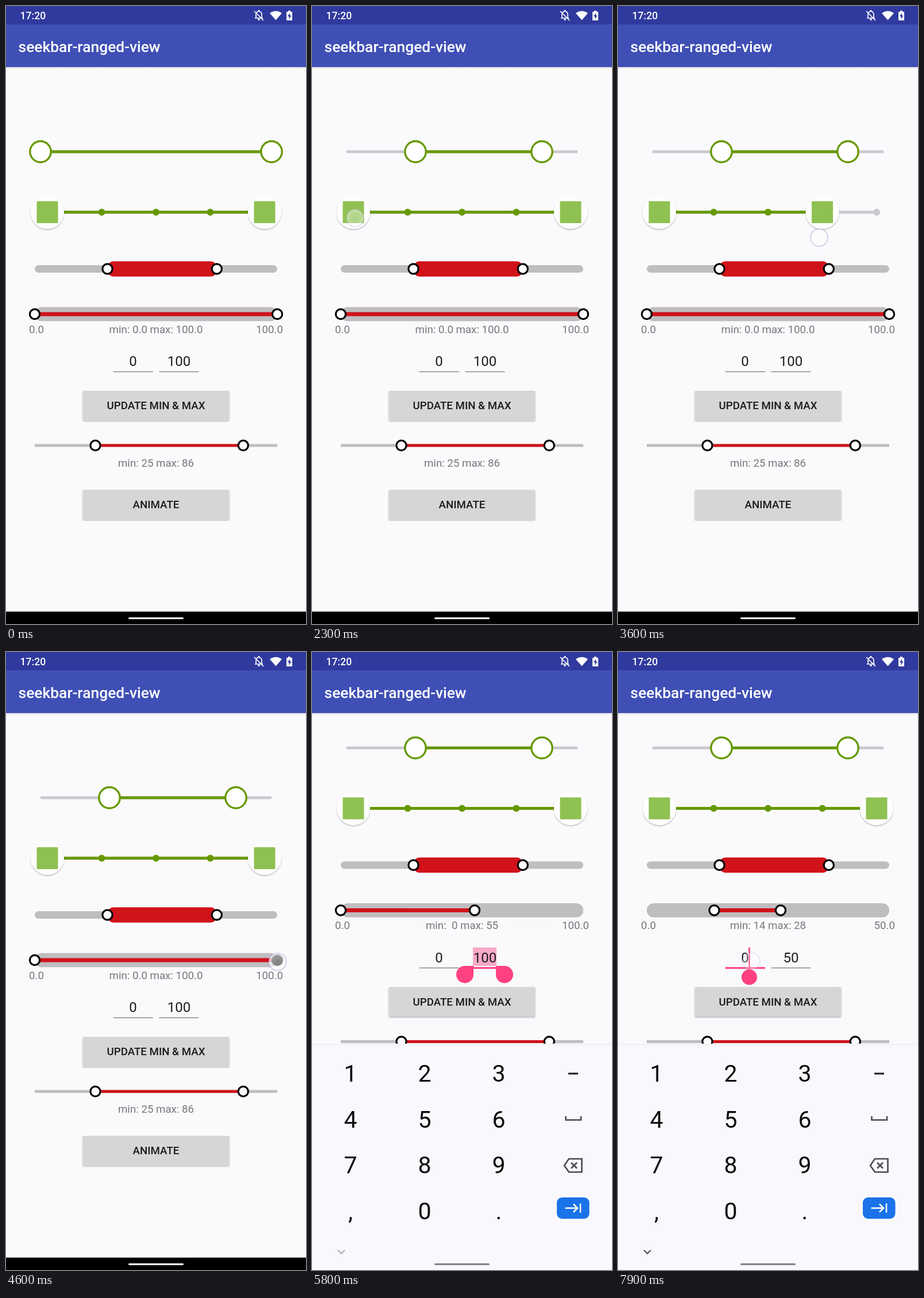
Animation of 522 by 1073 pixels, one loop 8 s. Source, as an HTML page:

```html
<!DOCTYPE html>
<html lang="en">
<head>
<meta charset="utf-8">
<title>seekbar-ranged-view</title>
<style>
  html, body { margin: 0; width: 100%; height: 100%; overflow: hidden; background: #faf9fc; }
  svg { display: block; width: 522px; height: 1073px; font-family: Roboto, Arial, sans-serif; }
  .label { font-size: 18.7px; fill: #78767a; }
  .field { font-size: 24px; fill: #1d1c1e; text-anchor: middle; }
  .button { font-size: 18.7px; font-weight: 500; fill: #1b1a1c; text-anchor: middle; }
  .key { font-size: 41px; fill: #0b0b0c; text-anchor: middle; }
  .mid { text-anchor: middle; }
  .end { text-anchor: end; }
  .pink { fill: #ff4081; }
  .icon { fill: none; stroke: #4a494d; stroke-width: 2.6; }
  .ring { fill: #fff; stroke: #000; stroke-width: 3.2; }
  .big { fill: #fff; stroke: #669900; stroke-width: 3.4; }
  .hot { fill: #ff4081; stroke: #ff4081; }
  .dark { fill: #111; }
</style>
</head>
<body>
<svg id="stage" viewBox="0 0 522 1073"></svg>
<script>
const LOOP = 8000, SHIFT = -86.5;
const STOPS = [72, 166.5, 261, 355.5, 450];
const GREEN = '#669900', RED = '#d0121a', GREY = '#bfbdc0', PALE = '#cbc9cd';

// Tables of [time, value...]
const track = {
  greenMin: [[300, 60], [1100, 180]],
  greenMax: [[1580, 462], [1950, 400]],
  rangeMin: [[7250, 50], [7600, 167.5]],
  rangeMax: [[4640, 472], [4860, 310], [5100, 283]],
  keyboard: [[5480, 0], [5740, 1]],
  popup: [[5780, 0], [5960, 1], [6120, 1], [6190, 0]],
  ripple: [[6680, 0], [6780, 1], [6860, 1], [7000, 0]]
};
const snap = {
  stepMin: [[0, 0], [2500, 1], [2650, 2], [2800, 1], [2900, 0]],
  stepMax: [[0, 4], [3400, 3], [3690, 4]],
  right: [[0, '100'], [6150, '5'], [6400, '50']]
};
// Each gesture: [time, x, y] points; fades in before the first and out after the last
const gestures = [
  [[220, 62, 256], [300, 62, 256], [1100, 182, 258]],
  [[1450, 463, 256], [1580, 463, 256], [1950, 401, 258]],
  [[2340, 75, 368], [2420, 76, 369], [2680, 262, 376], [2920, 74, 374]],
  [[3200, 452, 366], [3280, 452, 368], [3500, 350, 402], [3610, 350, 402], [3800, 474, 442], [3980, 474, 442]],
  [[4500, 472.5, 538], [4640, 472.5, 538], [4860, 311, 562], [5100, 284, 580]],
  [[5440, 301, 617], [5480, 301, 617]],
  [[6120, 196, 812], [6150, 196, 812]],
  [[6380, 196, 972], [6420, 196, 972]],
  [[6750, 262, 610], [6850, 262, 610]],
  [[7200, 51, 452], [7250, 51, 452], [7600, 168, 455]],
  [[7790, 232, 537], [7830, 232, 537]]
];

function lerpAt(rows, t, col = 1) {
  if (t <= rows[0][0]) return rows[0][col];
  for (let i = 1; i < rows.length; i++) {
    const a = rows[i - 1], b = rows[i];
    if (t < b[0]) return a[col] + (b[col] - a[col]) * (t - a[0]) / (b[0] - a[0]);
  }
  return rows[rows.length - 1][col];
}
const stepAt = (rows, t) => rows.filter(r => r[0] <= t).pop()[1];
const between = (t, a, b) => t >= a && t < b;

const rect = (x, y, w, h, fill, r = 0, id = '') =>
  `<rect ${id && `id="${id}"`} x="${x}" y="${y}" width="${w}" height="${h}" rx="${r}" fill="${fill}"/>`;
const bar = (x1, x2, y, h, fill, r = 0, id = '') => rect(x1, y - h / 2, x2 - x1, h, fill, r, id);
const disc = (x, y, r, cls, id = '') => `<circle ${id && `id="${id}"`} class="${cls}" cx="${x}" cy="${y}" r="${r}"/>`;
const text = (x, y, cls, s, id = '') => `<text ${id && `id="${id}"`} x="${x}" y="${y}" class="${cls}">${s}</text>`;
const button = (y, s, id) =>
  `<g filter="url(#lift)">${rect(133.5, y, 255, 51.5, '#d7d5d8', 2, id)}</g>` + text(261, y + 32.3, 'button', s);
const knob = id => `<g id="${id}"><circle cy="358" r="29" fill="#fefefe" filter="url(#lift)"/>
  ${rect(-18.5, 339, 37, 38, '#8fc152')}</g>`;

const statusBar = `
  ${rect(0, 0, 522, 106, '#3f4fb5')}${rect(0, 0, 522, 32, '#303a9e')}
  <text x="24.5" y="23" font-size="17.6" font-weight="500" fill="#fff">17:20</text>
  <text x="21.5" y="79.5" font-size="26.4" font-weight="500" fill="#fff">seekbar-ranged-view</text>
  <g fill="none" stroke="#fff" stroke-width="1.7">
    <path d="M433 21h14M435 21v-6q0-5 5-6 5 1 5 6v6M432 9l16 16"/>
    <path d="M438.3 23.5h3.4M440 7v2" stroke-width="2.4"/>
  </g>
  <path d="M459 12.5q10.500-7.500 21 0L469.500 24.500z" fill="#fff"/>
  <path d="M491 8h4v2h3v15h-10V10h3z" fill="#fff"/>
  <path d="M494 12l-4 6h2.500v5l4-6.500H494z" fill="#303a9e"/>`;

const content = `
  ${bar(60, 462, 253, 5, PALE)}${bar(60, 462, 253, 5, GREEN, 0, 'greenBar')}
  ${disc(60, 253, 18.2, 'big', 'greenMin')}${disc(462, 253, 18.2, 'big', 'greenMax')}
  ${bar(72, 450, 358, 5, PALE)}${bar(72, 450, 358, 5, GREEN, 0, 'stepBar')}
  ${STOPS.map((x, i) => disc(x, 358, 6, '', 'stop' + i)).join('')}
  ${knob('stepMin')}${knob('stepMax')}
  ${bar(50, 472, 456.5, 13, GREY, 6.5)}${bar(176.5, 366.8, 456.5, 26.5, RED, 11)}
  ${disc(176.5, 456.5, 8.6, 'ring')}${disc(366.8, 456.5, 8.6, 'ring')}
  ${bar(50, 472, 535, 24.5, GREY, 12)}${bar(50, 472, 535, 7, RED, 0, 'rangeBar')}
  ${disc(50, 535, 8.6, 'ring', 'rangeMin')}${disc(472, 535, 8.6, 'ring', 'rangeMax')}
  ${text(40, 567.7, 'label', '0.0')}${text(261, 567.7, 'label mid', '', 'rangeText')}
  ${text(482, 567.7, 'label end', '', 'limit')}
  ${rect(280, 599.5, 41, 32, '#f9a9c6', 0, 'selection')}
  ${text(221, 625, 'field', '0')}${text(301, 625, 'field', '', 'rightField')}
  ${bar(186.5, 256, 635, 1.4, '#858387', 0, 'lineLeft')}${bar(266.5, 335.5, 635, 1.4, '#858387', 0, 'lineRight')}
  ${rect(0, 599.5, 2.6, 35, '#ff4081', 0, 'cursor')}
  ${button(668, 'UPDATE MIN &amp; MAX', 'update')}
  ${bar(50, 472, 763, 5, GREY)}${bar(155.5, 412.8, 763, 5, RED)}
  ${disc(155.5, 763, 8.6, 'ring')}${disc(412.8, 763, 8.6, 'ring')}
  ${text(261, 800, 'label mid', 'min: 25 max: 86')}
  ${button(840, 'ANIMATE', 'animate')}
  <g id="handles" class="pink">
    <path d="M281 631.500v15a15 15 0 1 1-15-15z"/><path d="M320 631.500v15a15 15 0 1 0 15-15z"/>
  </g>
  <path id="handle" class="pink" d="M228.500 635l9.500 6.500a13.500 13.500 0 1 1-19 0z"/>
  <g id="popup"><g filter="url(#lift)">${rect(163, 527, 270, 64, '#fff', 4)}</g>
    ${text(208, 563.5, 'button', 'Cortar')}${text(294, 563.5, 'button', 'Copiar')}${text(384, 563.5, 'button', 'Partilhar')}
  </g>`;

const rows = ['123', '456', '789', ',0.'];
const keyboard = `
  ${rect(0, 680, 522, 3, '#f2f1f5')}${rect(0, 683, 522, 390, '#f9f8fc')}
  ${rows.map((row, j) => [...row].map((c, i) => text(67 + 129 * i, 746 + 79.7 * j, 'key', c)).join('')).join('')}
  ${rect(446, 730.5, 17, 3, '#1b1a1c')}
  <path class="icon" d="M441.500 806v6.500h26.500v-6.500"/>
  <path class="icon" d="M447 880h22.500v23H447l-8-11.500zM451 886.500l10 10M461 886.500l-10 10"/>
  ${rect(426, 947, 56.5, 37, '#1a73e8', 9)}
  <path d="M440.500 965.500h21M455 958.500l7 7-7 7M467 957.500v16" fill="none" stroke="#fff" stroke-width="2.6"/>
  <path id="chevron" class="icon" d="M45 1038.500l6 6 6-6" style="stroke-width:2"/>`;

document.getElementById('stage').innerHTML = `
  <defs>
    <filter id="lift" x="-20%" y="-20%" width="140%" height="150%">
      <feDropShadow dx="0" dy="1.6" stdDeviation="1.3" flood-color="#000" flood-opacity=".28"/>
    </filter>
    <radialGradient id="glow">
      <stop offset="0" stop-color="#fff" stop-opacity=".46"/>
      <stop offset=".6" stop-color="#fff" stop-opacity=".56"/>
      <stop offset="1" stop-color="#fff" stop-opacity=".82"/>
    </radialGradient>
    <linearGradient id="edge" x2="0" y2="1"><stop stop-color="#dddce2"/><stop offset="1" stop-color="#faf9fc"/></linearGradient>
  </defs>
  ${rect(0, 0, 522, 1073, '#faf9fc')}${rect(0, 106, 522, 4, 'url(#edge)')}
  <g id="content">${content}</g>
  ${statusBar}
  ${rect(0, 1051.5, 522, 21.5, '#000')}
  <g id="keyboard">${keyboard}</g>
  ${rect(213, 1061.5, 96, 3, '#fff', 1.5, 'pill')}
  <circle id="touch" r="15" fill="url(#glow)" stroke="#a9abd8" stroke-opacity=".65" stroke-width="1.5"/>`;

const el = {};
document.querySelectorAll('[id]').forEach(n => el[n.id] = n);
const set = (id, attrs) => { for (const k in attrs) el[id].setAttribute(k, attrs[k]); };
const show = (id, on) => set(id, { opacity: +on });
const span = (id, a, b) => set(id, { x: a, width: Math.max(0, b - a) });
const thumb = (id, x, cls) => set(id, { cx: x, class: cls });
const write = (id, s) => { if (el[id].textContent !== s) el[id].textContent = s; };

function drawTouch(t) {
  let alpha = 0;
  for (const g of gestures) {
    const first = g[0][0], last = g[g.length - 1][0];
    if (!between(t, first - 100, last + 130)) continue;
    const a = t < first ? (t - first + 100) / 100 : t > last ? 1 - (t - last) / 130 : 1;
    if (a < alpha) continue;
    alpha = a;
    set('touch', { cx: lerpAt(g, t, 1), cy: lerpAt(g, t, 2) });
  }
  show('touch', alpha);
}

function underline(id, on) {
  set(id, on ? { y: 633.6, height: 3, fill: '#ff4081' } : { y: 634.3, height: 1.4, fill: '#858387' });
}

function draw(t) {
  const v = {};
  for (const k in track) v[k] = lerpAt(track[k], t);

  thumb('greenMin', v.greenMin, between(t, 220, 1130) ? 'big hot' : 'big');
  thumb('greenMax', v.greenMax, between(t, 1450, 1980) ? 'big hot' : 'big');
  span('greenBar', v.greenMin, v.greenMax);

  const lo = STOPS[stepAt(snap.stepMin, t)], hi = STOPS[stepAt(snap.stepMax, t)];
  set('stepMin', { transform: `translate(${lo} 0)` });
  set('stepMax', { transform: `translate(${hi} 0)` });
  span('stepBar', lo, hi);
  STOPS.forEach((x, i) => set('stop' + i, { fill: x >= lo && x <= hi ? GREEN : PALE }));

  thumb('rangeMin', v.rangeMin, between(t, 7200, 7630) ? 'ring dark' : 'ring');
  thumb('rangeMax', v.rangeMax, between(t, 4500, 5130) ? 'ring dark' : 'ring');
  span('rangeBar', v.rangeMin, v.rangeMax);
  const max = t < 6800 ? 100 : 50;
  const value = x => String(Math.round((x - 50) / 422 * max)).padStart(2, '\u00a0');
  write('rangeText', t < 4640 ? 'min: 0.0 max: 100.0' : `min: ${value(v.rangeMin)} max: ${value(v.rangeMax)}`);
  write('limit', max + '.0');

  const editing = between(t, 5480, 7800), selected = between(t, 5480, 6150), leftFocus = t >= 7800;
  write('rightField', stepAt(snap.right, t));
  underline('lineLeft', leftFocus);
  underline('lineRight', editing);
  show('selection', selected);
  show('handles', between(t, 5640, 6150));
  show('handle', leftFocus);
  show('cursor', leftFocus || between(t, 6150, 6900) || between(t, 7400, 7800));
  set('cursor', { x: leftFocus ? 227.2 : t < 6400 ? 307 : 314 });
  show('popup', v.popup * v.popup);
  set('update', { fill: v.ripple > .5 ? '#c6c4c8' : '#d7d5d8' });

  const k = 1 - (1 - v.keyboard) ** 2;
  set('content', { transform: `translate(0 ${SHIFT * k})` });
  set('keyboard', { transform: `translate(0 ${394 * (1 - k)})` });
  set('pill', { fill: k > .3 ? '#7b7a7e' : '#fff' });
  show('chevron', t < 5850 ? .45 : 1);
  drawTouch(t);
}

const start = performance.now();
function frame() {
  draw((performance.now() - start) % LOOP);
  requestAnimationFrame(frame);
}
frame();
</script>
</body>
</html>
```
